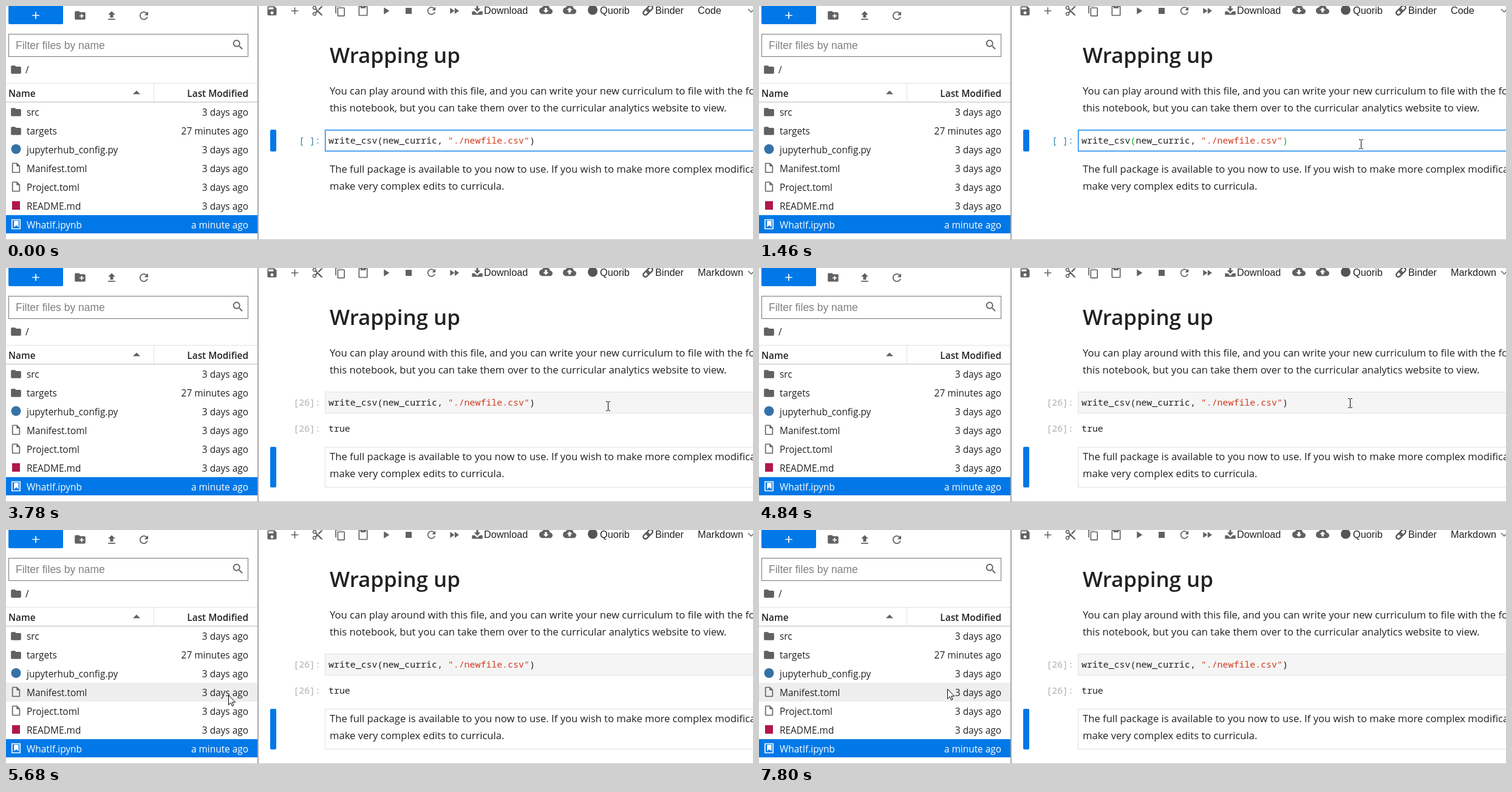
An HTML page that plays this animation: 1230 px wide and 386 px high, repeating every 7.99 s.

```html
<!DOCTYPE html>
<html lang="en">
<head>
<meta charset="utf-8">
<title>Notebook: wrapping up</title>
<style>
  html, body { margin: 0; width: 100%; height: 100%; overflow: hidden; background: #fff; }
  svg { display: block; position: absolute; left: 0; top: 0; }
  text { white-space: pre; fill: #212121; }
  .ui { font: 15.4px "Open Sans", "Noto Sans", sans-serif; }
  .head { font-weight: 600; }
  .prose { font: 16.62px "Open Sans", "Noto Sans", sans-serif; }
  .title { font: 600 34.9px "Open Sans", "Noto Sans", sans-serif; }
  .code { font: 14.92px "Noto Sans Mono", "DejaVu Sans Mono", monospace; }
  .bar { font: 16.25px "Liberation Sans", Arial, sans-serif; }
  .hint { font: 17.5px "Liberation Sans", Arial, sans-serif; fill: #808080; }
  .end { text-anchor: end; }
  .white { fill: #fff; }
  .icon { fill: #616161; }
</style>
</head>
<body>
<svg id="stage" width="1230" height="386" viewBox="0 0 1230 386" xmlns="http://www.w3.org/2000/svg"></svg>
<script>
const LOOP = 7990;
const BLUE = '#0078e7';
const stage = document.getElementById('stage');

const icons = {
  folder: 'M10 4H4c-1.1 0-1.99.9-1.99 2L2 18c0 1.1.9 2 2 2h16c1.1 0 2-.9 2-2V8c0-1.1-.9-2-2-2h-8l-2-2z',
  newFolder: 'M20 6h-8l-2-2H4c-1.11 0-1.99.89-1.99 2L2 18c0 1.11.89 2 2 2h16c1.11 0 2-.89 2-2V8c0-1.11-.89-2-2-2zm-1 8h-3v3h-2v-3h-3v-2h3V9h2v3h3v2z',
  upload: 'M5 20h14v-2H5v2zm0-10h4v6h6v-6h4l-7-7-7 7z',
  refresh: 'M17.65 6.35C16.2 4.9 14.21 4 12 4c-4.42 0-7.99 3.58-7.99 8s3.57 8 7.99 8c3.73 0 6.84-2.55 7.73-6h-2.08c-.82 2.33-3.04 4-5.65 4-3.31 0-6-2.69-6-6s2.69-6 6-6c1.66 0 3.14.69 4.22 1.78L13 11h7V4l-2.35 2.35z',
  search: 'M15.5 14h-.79l-.28-.27C15.41 12.59 16 11.11 16 9.5 16 5.91 13.09 3 9.5 3S3 5.91 3 9.5 5.91 16 9.5 16c1.61 0 3.09-.59 4.23-1.57l.27.28v.79l5 4.99L20.49 19l-4.99-5zm-6 0C7.01 14 5 11.99 5 9.5S7.01 5 9.5 5 14 7.01 14 9.5 11.99 14 9.5 14z',
  save: 'M17 3H5c-1.11 0-2 .9-2 2v14c0 1.1.89 2 2 2h14c1.1 0 2-.9 2-2V7l-4-4zm-5 16c-1.66 0-3-1.34-3-3s1.34-3 3-3 3 1.34 3 3-1.34 3-3 3zm3-10H5V5h10v4z',
  add: 'M19 13h-6v6h-2v-6H5v-2h6V5h2v6h6v2z',
  cut: 'M9.64 7.64c.23-.5.36-1.05.36-1.64 0-2.21-1.79-4-4-4S2 3.79 2 6s1.79 4 4 4c.59 0 1.14-.13 1.64-.36L10 12l-2.36 2.36C7.14 14.13 6.59 14 6 14c-2.21 0-4 1.79-4 4s1.79 4 4 4 4-1.79 4-4c0-.59-.13-1.14-.36-1.64L12 14l7 7h3v-1L9.64 7.64zM6 8c-1.1 0-2-.89-2-2s.9-2 2-2 2 .89 2 2-.9 2-2 2zm0 12c-1.1 0-2-.89-2-2s.9-2 2-2 2 .89 2 2-.9 2-2 2zM19 3l-6 6 2 2 7-7V3z',
  copy: 'M16 1H4c-1.1 0-2 .9-2 2v14h2V3h12V1zm3 4H8c-1.1 0-2 .9-2 2v14c0 1.1.9 2 2 2h11c1.1 0 2-.9 2-2V7c0-1.1-.9-2-2-2zm0 16H8V7h11v14z',
  paste: 'M19 2h-4.18C14.4.84 13.3 0 12 0c-1.3 0-2.4.84-2.82 2H5c-1.1 0-2 .9-2 2v16c0 1.1.9 2 2 2h14c1.1 0 2-.9 2-2V4c0-1.1-.9-2-2-2zm-7 0c.55 0 1 .45 1 1s-.45 1-1 1-1-.45-1-1 .45-1 1-1zm7 18H5V4h2v3h10V4h2v16z',
  run: 'M8 5v14l11-7z',
  stop: 'M6 6h12v12H6z',
  forward: 'M4 18l8.5-6L4 6v12zm9-12v12l8.5-6L13 6z',
  download: 'M10 1h4v8h4.5L12 16 5.5 9H10zM1 15h5.5l5.5 5 5.5-5H23v7H1z',
  cloud: 'M19.35 10.04C18.67 6.59 15.64 4 12 4 9.11 4 6.6 5.64 5.35 8.04 2.34 8.36 0 10.91 0 14c0 3.31 2.69 6 6 6h13c2.76 0 5-2.24 5-5 0-2.64-2.05-4.78-4.65-4.96z',
  file: 'M14 2H6c-1.1 0-2 .9-2 2v16c0 1.1.9 2 2 2h12c1.1 0 2-.9 2-2V8zM6 20V4h7v5h5v11z',
  book: 'M3 2h18v20H3zM5 4v16h14V4zM8 5h9v13l-4.5-4-4.5 4z'
};
icons.cloudDown = icons.cloud + 'M17 13l-5 5-5-5h3V9h4v4h3z';
icons.cloudUp = icons.cloud + 'M14 13v4h-4v-4H7l5-5 5 5h-3z';

function add(tag, attrs, parent = stage) {
  const el = document.createElementNS(stage.namespaceURI, tag);
  for (const key in attrs) el.setAttribute(key, attrs[key]);
  return parent.appendChild(el);
}
function rect(x, y, width, height, fill, more = {}, parent) {
  return add('rect', { x, y, width, height, fill, ...more }, parent);
}
function text(x, y, cls, str, parent) {
  const el = add('text', { x, y, class: cls }, parent);
  el.textContent = str;
  return el;
}
function icon(name, cx, cy, size = 20, cls = 'icon') {
  const k = size / 24;
  return add('path', {
    d: icons[name], class: cls, 'fill-rule': 'evenodd',
    transform: `translate(${cx - size / 2} ${cy - size / 2}) scale(${k})`
  });
}
function show(el, on) {
  el.setAttribute('visibility', on ? 'visible' : 'hidden');
}

// File browser
rect(4, -6, 90, 36, BLUE, { rx: 2 });
icon('add', 49, 15.5, 20, 'white');
icon('newFolder', 122, 15.5, 21);
icon('upload', 174, 16);
icon('refresh', 227, 16, 21);
rect(4.5, 46.5, 394, 37, '#fff', { stroke: '#757575' });
text(16, 71, 'hint', 'Filter files by name');
icon('search', 382, 64, 22);
icon('folder', 16.5, 105);
text(32, 111, 'ui', '/');
rect(0, 127, 414, 1, '#e0e0e0');
rect(243, 127, 1, 31, '#e0e0e0');
rect(0, 158, 414, 1, '#bdbdbd');
text(4, 150, 'ui head', 'Name');
text(399, 150, 'ui head end', 'Last Modified');
add('path', { d: 'M209 145.5l6-6 6 6z', class: 'icon' });

const hover = rect(0, 252, 414, 31, '#eee');
rect(0, 345, 414, 30, BLUE);

const days = '3 days ago';
[
  ['folder', 'src', days],
  ['folder', 'targets', '27 minutes ago'],
  ['dot', 'jupyterhub_config.py', days],
  ['file', 'Manifest.toml', days],
  ['file', 'Project.toml', days],
  ['square', 'README.md', days],
  ['book', 'WhatIf.ipynb', 'a minute ago']
].forEach(([kind, name, age], i) => {
  const y = 175 + 31 * i;
  const tone = kind === 'book' ? ' white' : '';
  if (kind === 'dot') add('circle', { cx: 16.5, cy: y - 1, r: 8, fill: '#3572a5' });
  else if (kind === 'square') rect(10, y - 8, 13, 14, '#b0174a');
  else icon(kind, 16.5, y - (kind === 'folder' ? 0 : 1), 20, tone ? 'white' : 'icon');
  text(34, y + 6, 'ui' + tone, name);
  text(399, y + 6, 'ui end' + tone, age);
});

// Toolbar
['save', 'add', 'cut', 'copy', 'paste', 'run', 'stop', 'refresh', 'forward']
  .forEach((name, i) => icon(name, 438 + 37.5 * i, 8));
icon('download', 776, 6.5, 19);
text(787, 13, 'bar', 'Download');
icon('cloudDown', 889, 6, 22);
icon('cloudUp', 928, 6, 22);
add('circle', { cx: 966, cy: 6.5, r: 8, fill: '#555' });
text(978, 13, 'bar', 'Quorib');
const chain = add('g', {
  transform: 'translate(1057 7) rotate(-45)', fill: 'none', stroke: '#555', 'stroke-width': 2.4
});
for (const x of [-9.5, -1.5]) rect(x, -3.5, 11, 7, 'none', { rx: 3.5 }, chain);
text(1069, 13, 'bar', 'Binder');
const cellType = text(1139, 13, 'bar', 'Code');
add('path', { d: 'M1222 5l5 5 5-5', fill: 'none', stroke: '#616161', 'stroke-width': 1.5 });

// Notebook
text(533, 94, 'title', 'Wrapping up');
text(533, 146, 'prose', 'You can play around with this file, and you can write your new curriculum to file with the following');
text(533, 174, 'prose', 'this notebook, but you can take them over to the curricular analytics website to view.');

const marker = rect(435, 204, 10, 36, BLUE, { rx: 2 });
const codeBox = rect(525.5, 204.5, 720, 35, '#fff');
const glow = rect(526.5, 205.5, 718, 33, 'none', { stroke: '#a8d4fa' });
const prompt = text(518, 227, 'code end', '');
const code = text(531, 227, 'code', '');
const [, open, , str, close] = ['write_csv', '(', 'new_curric, ', '"./newfile.csv"', ')'].map(part => {
  const span = add('tspan', {}, code);
  span.textContent = part;
  return span;
});
str.style.fill = '#d03c20';
const caret = rect(871, 211, 1, 22, '#000');

const output = add('g', {});
text(518, 270, 'code end', '[26]:', output).style.fill = '#b0b0b0';
text(531, 270, 'code', 'true', output);

const note = add('g', {});
const noteBox = rect(525.5, 253.5, 720, 66, '#fff', { stroke: '#e0e0e0' }, note);
text(533, 275, 'prose', 'The full package is available to you now to use. If you wish to make more complex modifications', note);
text(533, 303, 'prose', 'make very complex edits to curricula.', note);

// Frame lines
rect(414, 0, 2, 386, '#a8a8a8');
rect(0, 385, 1230, 1, '#c4c4c4');

// Pointers
const arrow = add('path', {
  d: 'M.5.5V16.5L4.2 13l2.3 5.5 2.4-1-2.3-5.4h5z', fill: '#fff', stroke: '#000'
});
const beam = add('path', {
  d: 'M-3.5-7.5h2.5l1 1 1-1h2.5M0-6.5V6.5M-3.5 7.5h2.5l1-1 1 1h2.5', fill: 'none', stroke: '#000'
});

// Evenly timed pointer steps along an eased line
function glide(t0, t1, count, from, to, ease) {
  return Array.from({ length: count }, (_, i) => {
    const p = i / (count - 1), e = ease(p);
    return [t0 + (t1 - t0) * p, from[0] + (to[0] - from[0]) * e, from[1] + (to[1] - from[1]) * e];
  });
}
const easeOut = p => 1 - (1 - p) ** 2;
const easeInOut = p => p * p * (3 - 2 * p);

const moves = [
  ...glide(170, 710, 9, [1144, 364], [998, 218], easeOut),
  [860, 1004, 212], [930, 1006, 210], [1000, 1003, 214], [1130, 995, 223], [1200, 992, 228],
  [4240, 978, 223],
  ...glide(4840, 5610, 12, [974, 223], [385, 253], easeInOut),
  ...glide(5680, 5950, 5, [366, 272], [316, 265], easeOut),
  [6540, 315, 265], [6940, 315, 264], [7010, 314, 264], [7210, 313, 264],
  [7410, 312, 263], [7540, 311, 262], [7800, 310, 262]
];

function drawPointer(t) {
  const at = moves.filter(m => m[0] <= t).pop();
  const overCode = at && at[1] > 525 && at[2] > 204 && at[2] < 240;
  show(arrow, at && !overCode);
  show(beam, overCode);
  if (!at) return;
  const x = Math.round(at[1]), y = Math.round(at[2]);
  arrow.setAttribute('transform', `translate(${x} ${y})`);
  beam.setAttribute('transform', `translate(${x - 0.5} ${y})`);
}

function draw(t) {
  const ran = t >= 1920, done = t >= 3780;
  const matched = t >= 930 && !ran;
  const shift = done ? 42 : 0;

  cellType.textContent = t >= 2050 ? 'Markdown' : 'Code';
  prompt.textContent = done ? '[26]:' : ran ? '[*]:' : '[ ]:';
  prompt.style.fill = ran ? '#b0b0b0' : '#307fa8';
  codeBox.setAttribute('fill', ran ? '#f5f5f5' : '#fff');
  codeBox.setAttribute('stroke', ran ? '#e0e0e0' : BLUE);
  show(glow, !ran);
  open.style.fill = close.style.fill = matched ? '#0b0' : '';
  show(caret, t >= 930 && t < 1460);

  marker.setAttribute('y', ran ? 253 + shift : 204);
  marker.setAttribute('height', ran ? 67 : 36);
  note.setAttribute('transform', `translate(0 ${shift})`);
  show(noteBox, ran);
  show(output, done);
  show(hover, t >= 5680);
  drawPointer(t);
}

function tick() {
  draw(performance.now() % LOOP);
  requestAnimationFrame(tick);
}
tick();
</script>
</body>
</html>
```
